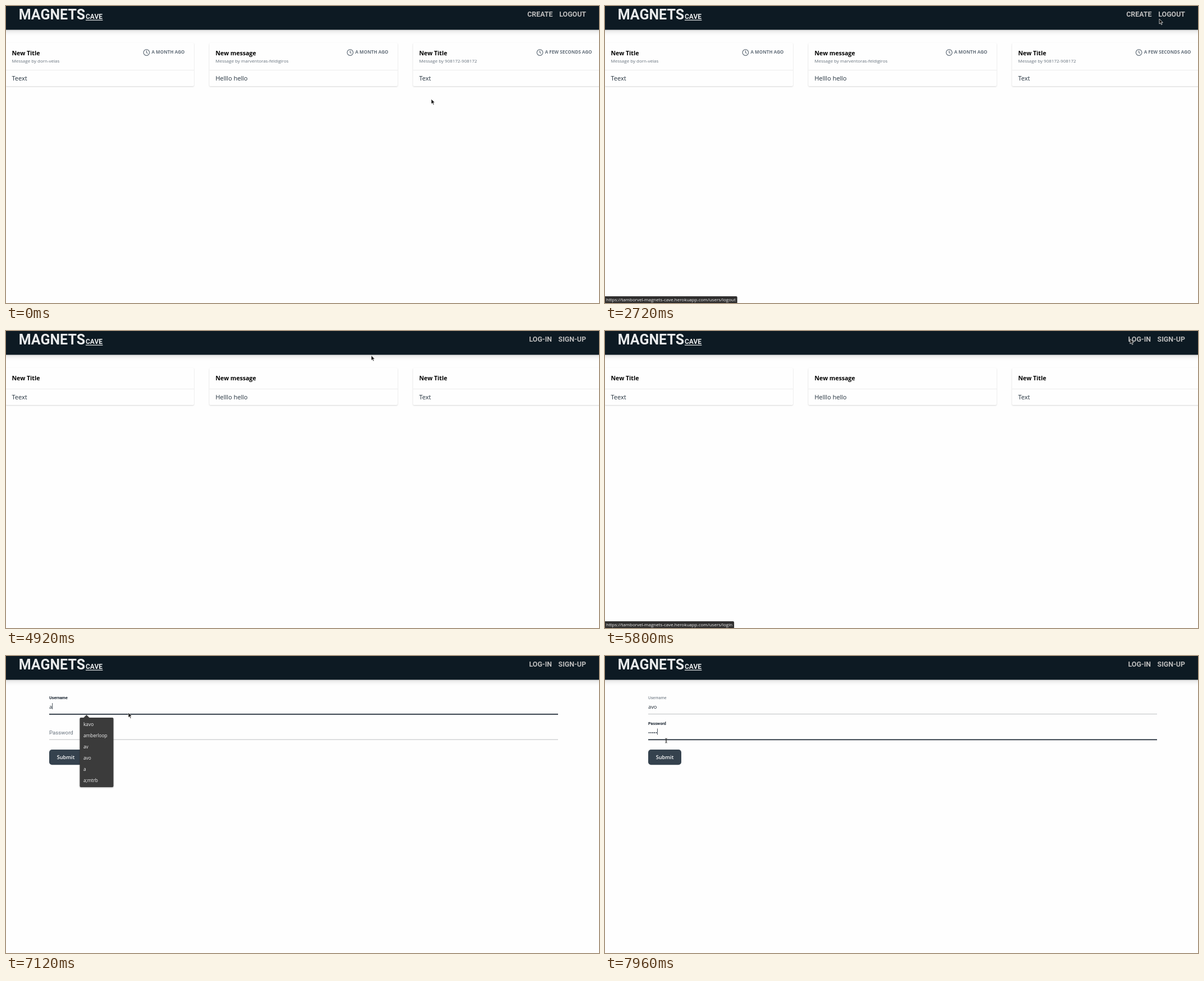
An HTML page for the animation above (8 s loop, 1057 by 530 pixels).

```html
<!DOCTYPE html>
<html lang="en">
<head>
<meta charset="utf-8">
<title>Message board</title>
<style>
  html, body { margin: 0; width: 100%; height: 100%; overflow: hidden; background: #fefefe; }
  svg { display: block; width: 1057px; height: 530px; font-family: "Open Sans", "Noto Sans", sans-serif; }
  .ui { font-family: Roboto, sans-serif; }
  .bar { filter: drop-shadow(0 2px 4px rgba(0, 0, 0, .16)); }
  .card { filter: drop-shadow(0 1.5px 1px rgba(0, 0, 0, .16)); }
  .pop { filter: drop-shadow(0 1px 1px rgba(0, 0, 0, .3)); }
</style>
</head>
<body>
<svg id="stage" viewBox="0 0 1057 530"></svg>
<script>
const LOOP = 8000;
const GRAY = '#66717c', DARK = '#1b2632';
const LOGGED_OUT = 2960, FORM = 6080, FOCUS_USER = 6840, FOCUS_PASS = 7600;
const SITE = 'https://tamborvel-magnets-cave.herokuapp.com/users/';
const stage = document.getElementById('stage');
const pen = document.createElement('canvas').getContext('2d');

const cards = [
  { title: 'New Title', by: 'dorn-velas', body: 'Teext', ago: 'A MONTH AGO' },
  { title: 'New message', by: 'marventoras-feldigiros', body: 'Helllo hello', ago: 'A MONTH AGO' },
  { title: 'New Title', by: '908172-908172', body: 'Text', ago: 'A FEW SECONDS AGO' }
];
const saved = ['kavo', 'amberloop', 'av', 'avo', 'a', 'a;mtrb'];

// Pointer stops: arrival time, x, y
const stops = [
  [0, 758, 166], [480, 895, 79], [920, 518, 104], [1640, 988, 23], [3640, 852, 92], [3800, 652, 147],
  [4400, 291, 101], [4640, 184, 95], [5120, 929, 13], [5600, 936, 14], [6720, 218, 101],
  [7400, 40, 122], [7580, 190, 162], [7840, 109, 151]
];

const between = (t, a, b) => t >= a && t < b;
const ramp = (t, from, ms) => Math.min(1, Math.max(0, (t - from) / ms));
const mix = (a, b, k) => a + (b - a) * k;
const ease = k => k * k * (3 - 2 * k);
const pulse = (t, a, b) => ramp(t, a, 140) - ramp(t, b, 140);

function text(x, y, size, str, fill, more = '') {
  return `<text x="${x}" y="${y}" font-size="${size}" fill="${fill}" ${more}>${str}</text>`;
}
function rect(x, y, w, h, fill, more = '') {
  return `<rect x="${x}" y="${y}" width="${w}" height="${h}" fill="${fill}" ${more}/>`;
}
function widthOf(str, size, weight = 400) {
  pen.font = `${weight} ${size}px "Open Sans", "Noto Sans", sans-serif`;
  return pen.measureText(str).width;
}

function navLink(right, str, hover) {
  const c = mix(188, 255, hover);
  return text(right, 19.3, 12.4, str, `rgb(${c},${c},${c})`, 'class="ui" font-weight="600" text-anchor="end"');
}

function header(t) {
  const brand = 'class="ui" font-weight="700"';
  const links = t < LOGGED_OUT
    ? navLink(974.5, 'CREATE', 0) + navLink(1034, 'LOGOUT', pulse(t, 1560, 2480))
    : navLink(973, 'LOG-IN', pulse(t, 5540, 5660)) + navLink(1034, 'SIGN-UP', 0);
  return rect(-10, -10, 1077, 52.5, '#0d1a23', 'class="bar"')
    + text(22.7, 23.6, 25, 'MAGNETS', '#e9ebec', brand)
    + text(142, 23.2, 12, 'CAVE', '#e9ebec', brand)
    + rect(142, 24.6, 30.5, 1.2, '#e9ebec') + links;
}

function card(c, i, member) {
  const left = 363 * i - .5, x = left + 11, drop = member ? 11 : 0;
  let s = rect(left, 66, 335.5, 66 + drop, '#fefefe', 'rx="2" class="card"')
    + rect(left, 103 + drop, 335.5, 1, '#ececec')
    + text(x, 88, 10.6, c.title, '#000', 'font-weight="700"')
    + text(x, 122 + drop, 11, c.body, '#23313d');
  if (member) {
    const end = left + 319, clock = end - widthOf(c.ago, 8.1, 700) - 9;
    s += text(x, 101, 8, 'Message by ' + c.by, GRAY)
      + text(end, 85, 8.1, c.ago, GRAY, 'font-weight="700" text-anchor="end"')
      + `<g fill="none" stroke="${GRAY}" stroke-width="1.2"><circle cx="${clock}" cy="83" r="5.3"/>`
      + `<path d="M${clock} 79.6v3.6l2.3 1.3"/></g>`;
  }
  return s;
}

function field(label, y, value, size, float, focused) {
  const line = focused ? rect(77, y + 9, 907, 1.7, DARK) : rect(77, y + 9.1, 907, 1, '#bdbfc1');
  const weight = focused && float > .5 ? 600 : 400;
  const caret = focused ? rect(77.2 + widthOf(value, size), y - 10, .8, 11, DARK) : '';
  return line + caret + text(77, y, size, value, DARK)
    + text(77, y - 17 * float, mix(9.7, 7.2, float), label, focused ? DARK : GRAY,
      `class="ui" font-weight="${weight}"`);
}

function popup(typed) {
  const list = saved.filter(name => name.includes(typed));
  return '<g class="pop"><path d="M138 110.5l5.5-5.5 5.5 5.5z" fill="#3b3b3b"/>'
    + rect(131.5, 110, 60, 20 * list.length + 4, '#3b3b3b', 'rx="2"') + '</g>'
    + list.map((name, i) => text(138, 125 + 20 * i, 8.3, name, '#f2f2f2')).join('');
}

function form(t) {
  const typed = 'avo'.slice(0, Math.ceil(3 * ramp(t, 6999, 480)));
  const dots = Math.floor(5 * ramp(t, 7680, 250));
  return field('Username', 94, typed, 9.3, ramp(t, FOCUS_USER, 150), between(t, FOCUS_USER, FOCUS_PASS))
    + field('Password', 139.5, '•'.repeat(dots), 8.5, ramp(t, FOCUS_PASS, 150), t >= FOCUS_PASS)
    + rect(77, 167, 59, 27.3, '#35424e', 'rx="5"')
    + text(106.5, 184.2, 9.2, 'Submit', '#fff', 'font-weight="600" text-anchor="middle"')
    + (between(t, 7000, 7440) ? popup(typed) : '');
}

function status(t) {
  const page = between(t, 1960, 3120) ? 'logout' : between(t, 5600, 6480) ? 'login' : '';
  if (!page) return '';
  const url = SITE + page;
  return rect(-3, 518, widthOf(url, 8) + 8, 15, '#302f2f', 'rx="2"') + text(2, 526.8, 8, url, '#f0f0f0');
}

// Rests at each stop, then leaves in time to reach the next; longer trips take longer
function pointerAt(t) {
  const i = stops.findIndex(s => s[0] > t);
  if (i < 0) return stops[stops.length - 1].slice(1);
  const [t0, x0, y0] = stops[i - 1], [t1, x1, y1] = stops[i];
  const trip = Math.min(t1 - t0, 80 + .9 * Math.hypot(x1 - x0, y1 - y0));
  const k = ease(ramp(t, t1 - trip, trip));
  return [mix(x0, x1, k), mix(y0, y1, k)];
}

function pointer(t) {
  let d = 'M0 0v9l2.1-1.9 1.5 3.3 1.5-.7-1.5-3.2h2.8z', style = 'fill="#111" stroke="#fff" stroke-width=".7"';
  if (between(t, 1600, 2480) || between(t, 5560, 5680)) {
    d = 'M-1 0q1-1 1.8 0v3.6l3.4.6q1 .3.9 1.4l-.5 4.4h-5.1l-3-3.8q.2-1.3 1.4-.7l1.1.8z';
    style = 'fill="#fff" stroke="#222" stroke-width=".6"';
  } else if (t >= FOCUS_PASS) {
    d = 'M-1.8-4q1.8 0 1.8 1v6q0 1-1.8 1M1.8-4q-1.8 0-1.8 1v6q0 1 1.8 1';
    style = 'fill="none" stroke="#333" stroke-width=".9"';
  }
  return `<path transform="translate(${pointerAt(t)})" d="${d}" ${style}/>`;
}

function draw(now) {
  const t = now % LOOP;
  const page = t < FORM ? cards.map((c, i) => card(c, i, t < LOGGED_OUT)).join('') : form(t);
  stage.innerHTML = page + header(t) + status(t) + pointer(t);
}

const start = performance.now();
function tick() {
  draw(performance.now() - start);
  requestAnimationFrame(tick);
}
tick();
</script>
</body>
</html>
```
